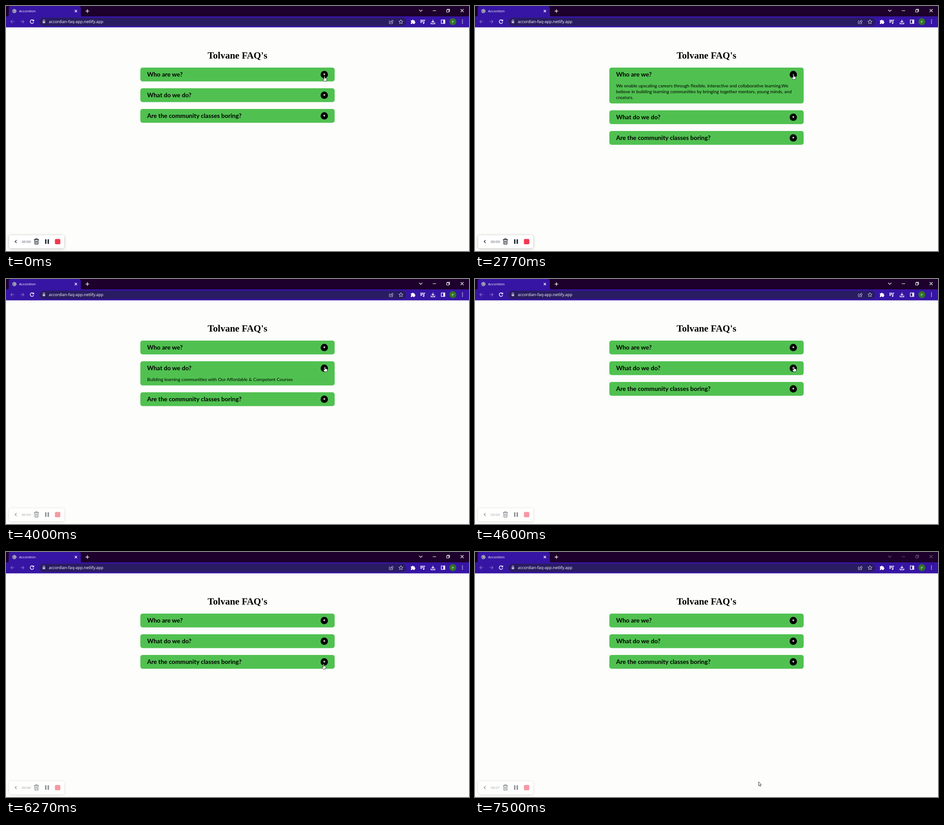
Write an HTML page that moves like this. It is 1027 px wide and 545 px high and loops after 7900 ms.

```html
<!DOCTYPE html>
<html lang="en">
<head>
<meta charset="utf-8">
<title>Accordion</title>
<style>
html, body { margin: 0; width: 100%; height: 100%; overflow: hidden; background: #fdfdfb; }
svg { display: block; width: 1027px; height: 545px; }
.ui { font-family: "Open Sans", "Noto Sans", sans-serif; fill: #fff; }
.line { fill: none; stroke: #fff; stroke-width: 1.1; }
.heading { font: bold 21px "Liberation Serif", serif; text-anchor: middle; }
.question { font: bold 13.6px Lato, sans-serif; }
.answer { font: 10.08px Lato, sans-serif; }
#timer { font: 8px "Liberation Sans", sans-serif; fill: #555b66; }
#recorder rect.box { filter: drop-shadow(0 1px 3px #0004); }
</style>
</head>
<body>
<svg viewBox="0 0 1027 545">
  <rect width="1027" height="545" fill="#fdfdfb"/>

  <!-- browser window -->
  <rect width="1027" height="24" fill="#1d002b"/>
  <rect y="23" width="1027" height="24.5" fill="#3615a4"/>
  <path d="M2 23.5Q6 23.5 6 19V5Q6 0 11 0H161Q166 0 166 5V19Q166 23.5 170 23.5Z" fill="#3615a4"/>
  <rect x="74" y="26" width="814" height="18.5" rx="9.2" fill="#291c62"/>
  <g class="line">
    <circle cx="18.5" cy="11.3" r="4.3" fill="#5c5a78" stroke="#c8c6d8" stroke-width=".8"/>
    <path d="M15 9.5l3 .5 1 2-2 1v2M19 7.5v2l3 1M20 14l2-2" stroke="#d8d6e6"/>
    <path d="M152.5 8.8l5 5m0-5l-5 5M176.5 11.3h8m-4-4v8" stroke-width="1.3"/>
    <path d="M18.5 34.7h-8m3.6-3.6l-3.6 3.6 3.6 3.6M32 34.7h8m-3.6-3.6l3.6 3.6-3.6 3.6" stroke="#8b79cd"/>
    <path d="M61 32.4a4 4 0 1 0 .5 3.6M61.6 30.4v2.8h-2.8" stroke-width="1.4"/>
    <path d="M82.3 34v-1.6a1.8 1.8 0 0 1 3.6 0V34" stroke="#b9b5d0"/>
    <path d="M852 33h-1.8v6.3h7.3V37M852.5 37q.5-4 4-4v-2l3 3-3 3v-2q-2.500 0-4 2z" stroke="#d2cfe2" stroke-width=".9"/>
    <path d="M876 30.400l1.400 3.100 3.300.300-2.500 2.200.8 3.300-3-1.800-3 1.800.8-3.300-2.500-2.200 3.300-.3z" stroke="#e2e0ee" stroke-width=".9"/>
    <path d="M919 31.500h7m-7 2.500h7m-7 2.500h4m4.300 2v-7h2.500" stroke-width="1.300"/>
    <path d="M947 30.500v6m-2.700-2.700l2.700 2.700 2.700-2.700M942.800 36.500v3h8.400v-3" stroke-width="1.300"/>
    <rect x="965.500" y="31" width="8" height="7.800" stroke-width="1.300"/>
  </g>
  <g fill="#fff">
    <rect x="81.300" y="33.800" width="5.600" height="4.400" rx=".6" fill="#b9b5d0"/>
    <path d="M898 32h2.700a1.600 1.600 0 0 1 3.200 0h2.600v2.700a1.600 1.600 0 0 1 0 3.200v2h-3a1.500 1.500 0 0 0-3 0H898v-2.600a1.600 1.600 0 0 0 0-3z"/>
    <circle cx="926.300" cy="38" r="1.600"/>
    <rect x="970" y="31" width="3.600" height="8"/>
    <circle cx="1012.500" cy="31.300" r="1"/><circle cx="1012.500" cy="34.800" r="1"/><circle cx="1012.500" cy="38.300" r="1"/>
  </g>
  <circle cx="991.200" cy="34.800" r="7.700" fill="#2f7426"/>
  <g class="ui">
    <text x="29" y="14" font-size="7.9">Accordion</text>
    <text x="95" y="38" font-size="8.9">accordian-faq-app.netlify.app</text>
    <text x="991.200" y="37.800" font-size="8" text-anchor="middle">P</text>
  </g>
  <path id="controls" class="line" stroke-width=".9" d="M916.500 8.500l3.500 3.500 3.500-3.500M946.500 10.500h7.500M977.500 8.500h5v5h-5zM979 8.500v-1.500h5v5h-1.500M1008.500 7l6.500 6.500m0-6.500l-6.500 6.500"/>

  <!-- page -->
  <text class="heading" x="513.500" y="117">Tolvane FAQ's</text>
  <g id="cards"></g>

  <!-- recorder bar -->
  <g id="recorder">
    <rect class="box" x="7" y="510" width="122" height="29" rx="4" fill="#fff"/>
    <path d="M23.500 520.700l-3.300 3.300 3.300 3.300M62 519.500h11m-7.500 0v-1.700h4v1.700M63.500 519.500l.5 10h7l.5-10M66.300 522v5m2.400-5v5" fill="none" stroke="#1b2430" stroke-width="1.300"/>
    <path d="M86.700 519h3v10h-3zM92.300 519h3v10h-3z" fill="#1b2430"/>
    <rect x="108.500" y="518.300" width="12" height="11.800" rx="2.500" fill="#f1384f"/>
    <text id="timer" x="35" y="527"></text>
  </g>

  <g id="cursor" fill="#fff" stroke="#111" stroke-width=".8" stroke-linejoin="round">
    <path id="hand" d="M-1 1Q0-.7 1 1V4.500L4 5Q5.500 5.300 5.300 7L4.500 11.300H-1.200L-3.700 7.600Q-3.900 6.200-2.500 6.400L-1 7.700Z"/>
    <path id="arrow" d="M0 0V9L2 7.200 3.400 10.300 4.800 9.700 3.500 6.700H6.200Z"/>
  </g>
</svg>
<script>
const LOOP = 7900;
const FAQ = [
  { q: "Who are we?", open: 1800, close: 2870, a: [
    "We enable upscaling careers through flexible, interactive and collaborative learning.We",
    "believe in building learning communities by bringing together mentors, young minds, and",
    "creators."] },
  { q: "What do we do?", open: 3870, close: 4600, a: [
    "Building learning communities with Our Affordable & Competent Courses"] },
  { q: "Are the community classes boring?", open: 5600, close: 6270, a: [
    "Not at all! Our community classes are interactive and fun, with live sessions, group",
    "projects and open discussions that help you learn together with mentors and other",
    "learners."] }
];
const TICKS = [770, 1830, 2770, 3770, 4770, 5770, 6770];
// cursor moves: start, end, x, y
const MOVES = [
  [100, 300, 706.5, 152],
  [3170, 3500, 707.5, 195],
  [4770, 5200, 704.5, 249],
  [6530, 7100, 629, 511]
];
const $ = id => document.getElementById(id);

function add(parent, tag, attrs, text = "") {
  const el = document.createElementNS("http://www.w3.org/2000/svg", tag);
  for (const key in attrs) el.setAttribute(key, attrs[key]);
  el.textContent = text;
  return parent.appendChild(el);
}

for (const item of FAQ) {
  item.g = add($("cards"), "g", {});
  item.box = add(item.g, "rect", { x: 298, width: 431, rx: 5, fill: "#50c150" });
  add(item.g, "text", { class: "question", x: 313, y: 20 }, item.q);
  item.body = add(item.g, "g", {});
  item.a.forEach((line, i) =>
    add(item.body, "text", { class: "answer", x: 313, y: 44 + 13 * i }, line));
  add(item.g, "circle", { cx: 706, cy: 15.4, r: 8.1 });
  item.sign = add(item.g, "path", { stroke: "#fff", "stroke-width": 1.2 });
}

const progress = (t, from, to) => Math.min(1, Math.max(0, (t - from) / (to - from)));
const show = (el, on) => el.setAttribute("visibility", on ? "visible" : "hidden");

function draw(t) {
  let top = 137, overButton = false;
  let x = 706.5, y = 156;
  for (const [from, to, toX, toY] of MOVES) {
    const p = progress(t, from, to), k = p * p * (3 - 2 * p);
    x += (toX - x) * k;
    y += (toY - y) * k;
  }

  for (const item of FAQ) {
    const open = t >= item.open && t < item.close;
    const height = 30.7 + (open ? 10 + 13 * item.a.length : 0);
    item.g.setAttribute("transform", `translate(0 ${top})`);
    item.box.setAttribute("height", height);
    item.sign.setAttribute("d", open ? "M704.7 15.2h2.6" : "M703.8 14.8h4.4m-2.2-2.2v4.4");
    show(item.body, open);
    overButton ||= Math.hypot(x - 706, y - top - 15.4) < 9;
    top += height + 15.3;
  }

  $("cursor").setAttribute("transform", `translate(${x} ${y})`);
  show($("hand"), overButton);
  show($("arrow"), !overButton);
  $("timer").textContent = "00:0" + TICKS.filter(tick => t >= tick).length;
  $("recorder").setAttribute("opacity", 1 - 0.5 * progress(t, 3770, 4000));
  $("controls").setAttribute("opacity", t < 7500 ? 1 : 0.35);
}

function frame() {
  draw(performance.now() % LOOP);
  requestAnimationFrame(frame);
}
frame();
</script>
</body>
</html>
```
